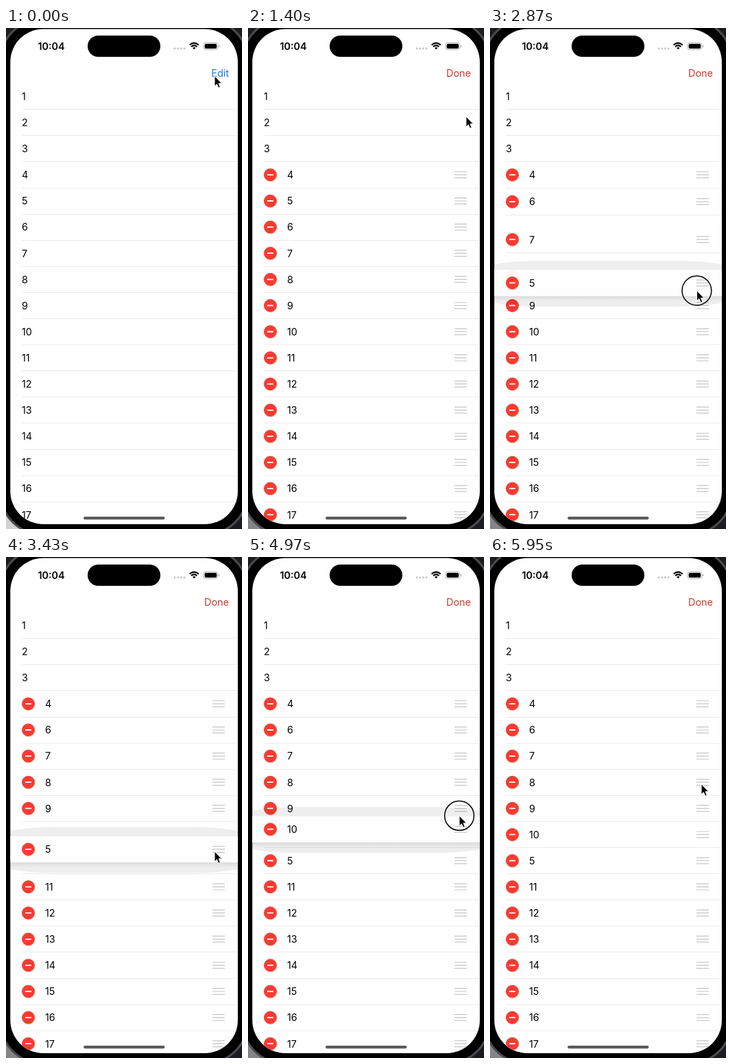
An HTML page for the animation above (6.3 s loop, 344 px wide and 730 px high).

```html
<!DOCTYPE html>
<html lang="en">
<head>
<meta charset="utf-8">
<title>List reordering</title>
<style>
  html, body { margin: 0; width: 100%; height: 100%; overflow: hidden; background: #1c1b20; }
  svg { display: block; width: 344px; height: 730px; font: 14.4px Inter, "Liberation Sans", sans-serif; }
</style>
</head>
<body>
<svg id="stage" viewBox="0 0 344 730">
  <defs>
    <clipPath id="screen"><rect x="6.3" y="1.5" width="331.6" height="721.5" rx="48"/></clipPath>
    <linearGradient id="below" x2="0" y2="1">
      <stop stop-color="#000" stop-opacity=".08"/><stop offset="1" stop-color="#000" stop-opacity="0"/>
    </linearGradient>
  </defs>

  <rect width="344" height="730" fill="#1c1b20"/>
  <rect id="desk" y="700" width="20" height="30"/>
  <rect x="-8.5" y="-13" width="361" height="751" rx="62" fill="#000" stroke="#4b4b4d" stroke-width="3"/>

  <g clip-path="url(#screen)">
    <rect width="344" height="730" fill="#fff"/>
    <g id="list"></g>
    <text id="action" x="325" y="71" text-anchor="end"></text>

    <text x="66" y="31.5" text-anchor="middle" font-weight="600">10:04</text>
    <rect x="119" y="11" width="106" height="31" rx="15.5"/>
    <path d="M246 29.7H261" stroke="#c6c6c8" stroke-width="3" stroke-linecap="round" stroke-dasharray="0 4.7"/>
    <g fill="none" stroke="#000" stroke-width="2.1">
      <path d="M267.6 24.8Q274.2 18.9 280.8 24.8M270 27.3Q274.2 23.6 278.4 27.3"/>
      <path d="M272 28.9Q274.2 27.2 276.4 28.9L274.2 31.2Z" fill="#000" stroke="none"/>
    </g>
    <rect x="288" y="21.4" width="20.8" height="10.2" rx="3.3" fill="none" stroke="#a5a5a7" stroke-width=".9"/>
    <rect x="289.6" y="23" width="17.6" height="7" rx="2"/>
    <path d="M310 24.9q1.4 .5 1.4 1.6t-1.4 1.6z" fill="#a5a5a7"/>
    <rect x="113" y="712" width="118.5" height="4.2" rx="2.1" fill="#5b5b5c"/>
  </g>

  <circle id="ring" r="21.4" fill="none" stroke="#000" stroke-width="1.5"/>
  <path id="cursor" d="M0 0V15L3.4 11.8L5.8 17.3L8.3 16.2L6 10.8H10.6Z"
        stroke="#fff" stroke-width="1" stroke-linejoin="round"/>
</svg>

<script>
const LOOP = 6300, STEP = 70, PITCH = 38.1, COUNT = 17;
const SETTLE = 350, SHIFT = 300, FADE = 140;
const EDIT = { press: 420, start: 490, time: 280 };

const $ = id => document.getElementById(id);
const clamp = v => Math.min(1, Math.max(0, v));
const smooth = v => { v = clamp(v); return v * v * (3 - 2 * v); };
const easeOut = power => v => 1 - (1 - clamp(v)) ** power;
const mix = (a, b, p) => a + (b - a) * p;
const slotY = n => 99.6 + PITCH * (n - 1);
const slotAt = y => Math.round((y - slotY(1)) / PITCH) + 1;

// Pointer strokes; bend pushes the middle of a stroke sideways.
const HOME = { x: 304, y: 70 };
const MOVES = [
  { from: 1330, to: 2030, x: 313.5, y: 257, bend: 13, ease: easeOut(3.6) },
  { from: 2450, to: 3075, x: 303, y: 425, bend: -6, ease: smooth },
  { from: 3150, to: 3290, x: 304, y: 429, bend: 0, ease: smooth },
  { from: 4340, to: 4550, x: 308, y: 400, bend: 0, ease: smooth },
  { from: 4830, to: 5390, x: 308, y: 331, bend: 0, ease: easeOut(1.41) }
];
const PRESSES = [[350, 630], [2100, 3290], [4550, 5530]];

// A dragged row trails the pointer, then settles into its home slot.
const DRAGS = [
  { n: 10, start: 4900, release: 5410, lag: 95, grip: -4.4, home: 9 },
  { n: 5, start: 2450, release: 3360, lag: 17, grip: 5, home: 10 }
];

function pointer(t) {
  let { x, y } = HOME;
  for (const m of MOVES) {
    const p = m.ease((t - m.from) / (m.to - m.from));
    x = mix(x, m.x, p) + m.bend * Math.sin(Math.PI * p);
    y = mix(y, m.y, p);
  }
  return { x, y };
}

function dragY(drag, t) {
  const held = pointer(Math.min(t, drag.release) - drag.lag).y - drag.grip;
  return mix(held, slotY(drag.home), smooth((t - drag.release) / SETTLE));
}

// Whenever a dragged row enters a new slot, the row there swaps places with it.
function planShifts() {
  const order = Array.from({ length: COUNT }, (_, i) => i + 1);
  const shifts = order.map(() => []);
  for (const drag of [...DRAGS].sort((a, b) => a.start - b.start)) {
    let slot = order.indexOf(drag.n) + 1;
    for (let t = drag.start; t <= drag.release + SETTLE; t += 5) {
      const next = slotAt(dragY(drag, t));
      if (next === slot) continue;
      const other = order[next - 1];
      shifts[other - 1].push({ t, slot });
      order[slot - 1] = other;
      order[next - 1] = drag.n;
      slot = next;
    }
  }
  return shifts;
}

function set(el, attrs) {
  for (const name in attrs) el.setAttribute(name, attrs[name]);
  return el;
}

function add(parent, tag, attrs = {}) {
  return parent.appendChild(set(document.createElementNS("http://www.w3.org/2000/svg", tag), attrs));
}

function show(el, visible) {
  set(el, { visibility: visible ? "visible" : "hidden" });
}

function separator(parent) {
  return add(parent, "rect", {
    x: 23, y: 18.6, width: 321, height: 1, fill: "#ebebec", "shape-rendering": "crispEdges"
  });
}

function makeRow(n) {
  const g = add($("list"), "g");
  const row = { n, g, drag: DRAGS.find(d => d.n === n) };
  if (row.drag) {
    row.gap = separator(g);
    row.shadow = add(g, "g");
    add(row.shadow, "rect", { x: -8, y: -32.5, width: 360, height: 67, rx: 80, ry: 13, opacity: .065 });
    add(row.shadow, "rect", { y: 19, width: 344, height: 8, fill: "url(#below)" });
    row.back = add(g, "rect", { y: -19, width: 344, height: 38.1, fill: "#fff", opacity: .95 });
  }
  row.line = separator(g);
  row.label = add(g, "text", { x: 23, y: 5.3 });
  row.label.textContent = n;
  if (n > 3) {
    row.minus = add(g, "g");
    add(row.minus, "circle", { cx: 33.1, cy: .8, r: 9.7, fill: "#f4e0d2" });
    add(row.minus, "circle", { cx: 32.5, r: 9, fill: "#fb3b31", stroke: "#d8453c", "stroke-width": .9 });
    add(row.minus, "rect", { x: 28, y: -.9, width: 9, height: 1.8, rx: .6, fill: "#fff" });
    row.grip = add(g, "path", {
      d: "M301 -4.4h18M301 0h18M301 4.4h18", stroke: "#c5c5c7", "stroke-width": 1.2
    });
  }
  return row;
}

function rowY({ n, drag }, t) {
  if (drag && t >= drag.start) return dragY(drag, t);
  return shifts[n - 1].reduce((y, s) => mix(y, slotY(s.slot), smooth((t - s.t) / SHIFT)), slotY(n));
}

function drawRow(row, t, edit) {
  const y = rowY(row, t);
  set(row.g, { transform: `translate(0 ${y.toFixed(2)})` });
  if (row.minus) {
    const away = 34 * (1 - edit);
    set(row.label, { x: mix(23, 57, edit) });
    set(row.minus, { opacity: edit, transform: `translate(${-away} 0)` });
    set(row.grip, { opacity: edit, transform: `translate(${away} 0)` });
  }
  if (row.drag) {
    const { start, release } = row.drag;
    const lifted = t >= start && t < release + SETTLE;
    [row.gap, row.shadow, row.back].forEach(el => show(el, lifted));
    show(row.line, !lifted);
    set(row.shadow, { opacity: clamp((release + STEP + FADE - t) / FADE) });
    set(row.gap, { transform: `translate(0 ${slotY(slotAt(y)) - y})` });
  }
}

function draw(t) {
  const progress = clamp((t - EDIT.start) / EDIT.time);
  rows.forEach(row => drawRow(row, t, smooth(progress)));

  const pressed = t >= EDIT.press, done = progress > 0;
  $("action").textContent = done ? "Done" : "Edit";
  set($("action"), {
    fill: done ? "#c93a30" : "#1f7ad0",
    opacity: pressed ? mix(.35, 1, progress) : 1
  });
  set($("desk"), { fill: pressed ? "#858587" : "#d2d2d2" });

  const { x, y } = pointer(t);
  const press = Math.max(...PRESSES.map(([from, to]) => clamp(Math.min(t - from, to - t) / FADE)));
  set($("cursor"), { transform: `translate(${x} ${y})` });
  set($("ring"), { transform: `translate(${x} ${y})`, opacity: press });
}

const shifts = planShifts();
// Draggable rows come last so they sit above the others.
const dragged = DRAGS.map(d => d.n);
const still = shifts.map((_, i) => i + 1).filter(n => !dragged.includes(n));
const rows = [...still, ...dragged].map(makeRow);
const begin = performance.now();

function tick() {
  const t = (performance.now() - begin) % LOOP;
  draw(Math.floor(t / STEP) * STEP);
  requestAnimationFrame(tick);
}
tick();
</script>
</body>
</html>
```
